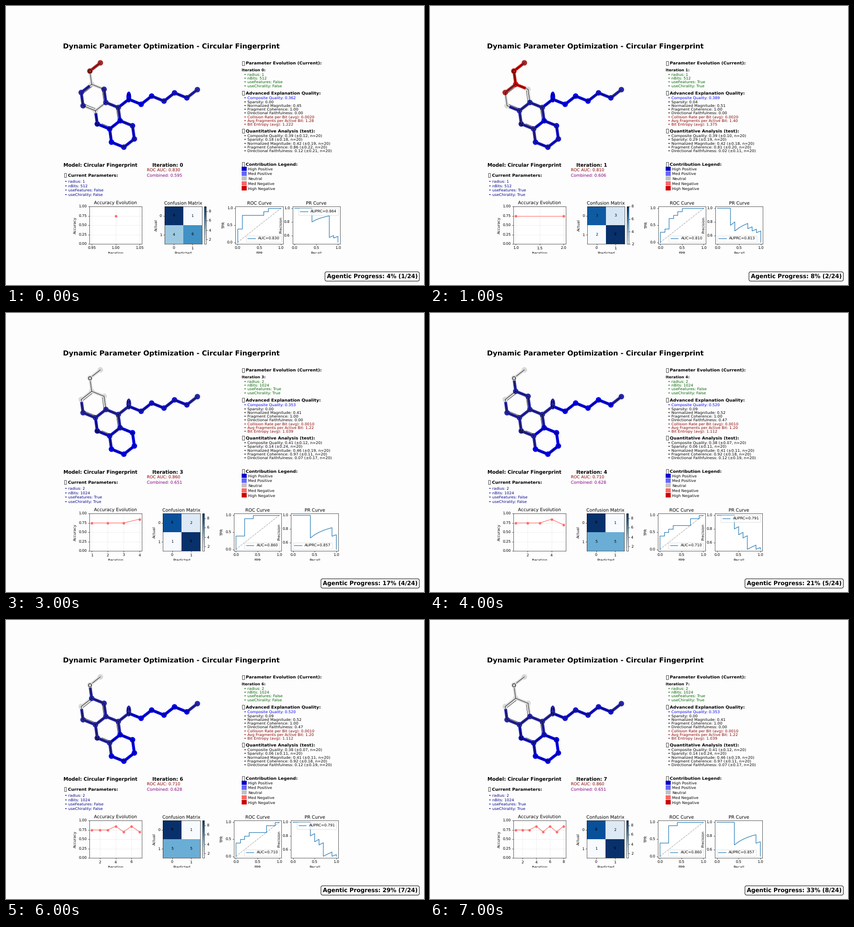
A matplotlib script for the animation above (8 s loop, 917 by 611 pixels).

```python
import numpy as np
import matplotlib as mpl
import matplotlib.pyplot as plt
from matplotlib.animation import FuncAnimation
from matplotlib.patches import Circle, Ellipse, Rectangle

W, H, DPI = 917, 611, 64
PT = 72 / DPI            # points per pixel
BG = "#fdfdfd"

# The small charts use the default style, scaled down.
mpl.rcParams.update({"font.family": "DejaVu Sans", "text.hinting": "none"})
STYLE_KEYS = ["font.size", "lines.linewidth", "lines.markersize",
              "lines.markeredgewidth", "axes.linewidth", "axes.labelpad",
              "axes.titlepad", "grid.linewidth", "patch.linewidth"]
STYLE_KEYS += [f"{a}tick.major.{k}" for a in "xy" for k in ("size", "width", "pad")]
for key in STYLE_KEYS:
    mpl.rcParams[key] *= 0.819 * PT


def walk(start, turns, length=29.24, tilt=22):
    """Points reached by unit bonds, each digit a multiple of 60 degrees."""
    angles = np.radians(tilt + 60 * np.array([int(t) for t in turns]))
    steps = length * np.column_stack([np.cos(angles), np.sin(angles)])
    return start + np.cumsum(steps, axis=0)


# Molecule: aromatic backbone, saturated ring, amine chain.
START = np.array([[207, 124.5]])
BACKBONE = np.vstack([START, walk(START[0], "21210105434")])
ATOMS = np.vstack([BACKBONE, walk(BACKBONE[8], "0123"),
                   walk(BACKBONE[9], "5050505")])
OXYGEN, NITROGEN, AMINE = 1, 6, 16
BENZO, PYRIDINE = [2, 3, 4, 5, 10, 11], [5, 6, 7, 8, 9, 10]
BONDS = [(k, k + 1) for k in range(22) if k not in (11, 15)]
BONDS += [(11, 2), (10, 5), (8, 12), (15, 7), (9, AMINE)]
DOUBLE = {(2, 3): BENZO, (4, 5): BENZO, (10, 11): BENZO,
          (6, 7): PYRIDINE, (8, 9): PYRIDINE}
GAPS = {OXYGEN: 7, NITROGEN: 6, AMINE: 6}
SHADES = {"R": "#cd0f0f", "r": "#a82a2a", ".": "#d9d9d9",
          "1": "#2828a8", "2": "#1414cc", "3": "#0000ee"}

QUALITY = ["Composite Quality", "Sparsity", "Normalized Magnitude",
           "Fragment Coherence", "Directional Faithfulness",
           "Collision Rate per Bit (avg)", "Avg Fragments per Active Bit",
           "Bit Entropy (avg)"]
LEGEND = [("High Positive", "#0000cc"), ("Med Positive", "#6666ff"),
          ("Neutral", "#c0c0c0"), ("Med Negative", "#ff6666"),
          ("High Negative", "#cc0000")]


class Setting:
    """One parameter choice; scores follow from the ranked test items."""

    def __init__(self, radius, flag, ranking, cut, combined, quality, test, tones):
        bits = 512 * radius
        self.flag, self.combined, self.tones = flag, combined, tones
        self.params = [f"radius: {radius}", f"nBits: {bits}",
                       f"useFeatures: {flag}", f"useChirality: {flag}"]
        values = quality.split()
        values.insert(5, f"{1 / bits:.4f}")
        self.quality = [f"{n}: {v}" for n, v in zip(QUALITY, values)]
        pairs = [v.split("/") for v in test.split()]
        self.test = [f"{n}: {m} (±{d}, n=20)" for n, (m, d) in zip(QUALITY, pairs)]

        hits = np.array([c == "P" for c in ranking])
        tp, fp = np.cumsum(hits), np.cumsum(~hits)
        precision = tp / (tp + fp)
        self.tpr, self.fpr = np.r_[0, tp] / 10, np.r_[0, fp] / 10
        self.precision = np.r_[1, precision]
        self.auc = tp[~hits].sum() / 100
        self.auprc = precision[hits].mean()
        t, f = tp[cut - 1], fp[cut - 1]
        self.matrix = np.array([[10 - f, f], [10 - t, t]])
        self.accuracy = np.trace(self.matrix) / 20


SETTINGS = {
    "A": Setting(1, False, "PPPPNPPPPNNNNNPNPNNN", 7, "0.595",
                 "0.362 0.00 0.45 1.00 0.00 1.28 1.222",
                 "0.39/0.12 0.18/0.18 0.42/0.19 0.86/0.22 0.12/0.21",
                 "rr.11.233111" "2223" "3332221"),
    "B": Setting(1, True, "PPPNPNPPPNPNPNPNNNNN", 11, "0.606",
                 "0.389 0.04 0.51 1.00 0.00 1.40 1.375",
                 "0.39/0.10 0.29/0.19 0.42/0.18 0.81/0.20 0.02/0.11",
                 "rRRr.111311." "2222" "3333221"),
    "C": Setting(2, False, "PPPPNPNPNPNNNNPPNNPN", 6, "0.628",
                 "0.520 0.09 0.52 1.00 0.47 1.20 1.112",
                 "0.38/0.07 0.06/0.11 0.41/0.11 0.92/0.18 0.12/0.19",
                 "..1.11113111" "3333" "1333331"),
    "D": Setting(2, True, "PPPPNNPPPPPNNPNNNNNN", 11, "0.651",
                 "0.353 0.00 0.41 1.00 0.00 1.22 1.039",
                 "0.41/0.12 0.14/0.24 0.46/0.19 0.97/0.11 0.07/0.17",
                 "....1122211." "3333" "1222221"),
}
SEQUENCE = "ABADCDCD"
TOTAL = 24

fig = plt.figure(figsize=(W / DPI, H / DPI), dpi=DPI, facecolor=BG)


def page_axes():
    ax = fig.add_axes([0, 0, 1, 1])
    ax.set(xlim=(0, W), ylim=(H, 0))
    ax.axis("off")
    return ax


def box_axes(left, width, top=439.3, height=82):
    return fig.add_axes([left / W, 1 - (top + height) / H, width / W, height / H])


def write(ax, x, y, text, px, color="black", bold=False, ha="left"):
    """Text whose capitals are centred on height y."""
    ax.text(x, y + 0.365 * px, text, fontsize=px * PT, color=color, ha=ha,
            va="baseline", weight="bold" if bold else "normal")


def heading(ax, x, y, text):
    ax.add_patch(Rectangle((x + 1.2, y - 4.6), 4.4, 9.3, fill=False, lw=0.7 * PT))
    write(ax, x + 9.3, y, text, 9.47, bold=True)


def bullets(ax, x, y, lines, step, colors):
    for k, (line, color) in enumerate(zip(lines, colors)):
        write(ax, x, y + k * step, "• " + line, 8.38, color)


def draw_molecule(ax, tones):
    for a, b in BONDS:
        p, q = ATOMS[a], ATOMS[b]
        # A bond takes the shade of the atom it leads to.
        ax.plot(*zip(p, q), color=SHADES[tones[b]], lw=6.4 * PT,
                solid_capstyle="butt", zorder=1)
        u = (q - p) / np.hypot(*(q - p))
        ends = p + u * GAPS.get(a, 0), q - u * GAPS.get(b, 0)
        ax.plot(*zip(*ends), color="black", lw=0.85 * PT, zorder=4)
        if (a, b) in DOUBLE:
            side = np.array([-u[1], u[0]])
            side *= np.sign(side @ (ATOMS[DOUBLE[a, b]].mean(axis=0) - p))
            inner = ends[0] + 4.3 * side + 3 * u, ends[1] + 4.3 * side - 3 * u
            ax.plot(*zip(*inner), color="black", lw=0.75 * PT, zorder=4)
    for k, p in enumerate(ATOMS):
        style = dict(color=SHADES[tones[k]], lw=0, zorder=2)
        ax.add_patch(Ellipse(p - (0, 5), 10.4, 24, **style) if k == AMINE
                     else Circle(p, 6, **style))
    for k, name, rise in [(OXYGEN, "O", 0), (NITROGEN, "N", 0),
                          (AMINE, "N", 0), (AMINE, "H", 10)]:
        x, y = ATOMS[k]
        write(ax, x, y + 0.4 - rise, name, 11, ha="center")


def draw_text(ax, s, step):
    write(ax, 125.4, 87, "Dynamic Parameter Optimization - Circular Fingerprint",
          15.44, bold=True)

    heading(ax, 517, 125.2, "Parameter Evolution (Current):")
    write(ax, 516.6, 140.3, f"Iteration {step}:", 8.2, bold=True)
    bullets(ax, 522.4, 149.6, s.params, 8.25, ["darkgreen"] * 4)

    heading(ax, 517, 190.5, "Advanced Explanation Quality:")
    bullets(ax, 522.4, 200.5, s.quality, 8.27,
            ["blue"] + ["black"] * 4 + ["darkred"] * 3)

    heading(ax, 517, 273.3, "Quantitative Analysis (test):")
    bullets(ax, 522.4, 283.2, s.test, 8.32, ["black"] * 5)

    write(ax, 125.8, 347.7, "Model: Circular Fingerprint", 10.65, bold=True)
    write(ax, 321.3, 347.7, f"Iteration: {step}", 10.65, bold=True)
    write(ax, 309.4, 358.2, f"ROC AUC: {s.auc:.3f}", 9, "darkred")
    write(ax, 309.4, 370.2, f"Combined: {s.combined}", 9, "purple")
    heading(ax, 126.3, 370.3, "Current Parameters:")
    bullets(ax, 129, 384, s.params, 9.45, ["darkblue"] * 4)

    heading(ax, 517, 347, "Contribution Legend:")
    for k, (name, color) in enumerate(LEGEND):
        y = 356.5 + 10.65 * k
        ax.add_patch(Rectangle((517, y - 4.7), 11.2, 9.2, color=color, lw=0))
        write(ax, 531, y, name, 8.38)


def draw_accuracy(step):
    ax = box_axes(183, 115)
    values = [SETTINGS[c].accuracy for c in SEQUENCE[:step + 1]]
    ax.plot(range(1, step + 2), values, "o-", color="#ff6b6b")
    ax.set(ylim=(0, 1), yticks=np.linspace(0, 1, 5), title="Accuracy Evolution",
           xlabel="Iteration", ylabel="Accuracy")
    ax.grid(alpha=0.3)


def draw_confusion(s, dx):
    ax = box_axes(347.6 + dx, 82)
    image = ax.imshow(s.matrix, cmap="Blues", aspect="auto")
    ax.set(xticks=[0, 1], yticks=[0, 1], title="Confusion Matrix",
           xlabel="Predicted", ylabel="Actual")
    for (r, c), n in np.ndenumerate(s.matrix):
        ax.text(c, r, n, ha="center", va="center")
    fig.colorbar(image, cax=box_axes(434.5 + dx, 4.3), ticks=[2, 4, 6, 8])


def draw_curves(s, dx):
    halves = [0, 0.5, 1]
    roc = box_axes(503.3 + dx, 104.5)
    roc.plot(s.fpr, s.tpr, label=f"AUC={s.auc:.3f}")
    roc.plot([0, 1], [0, 1], "k--", alpha=0.3)
    roc.set(title="ROC Curve", xlabel="FPR", ylabel="TPR",
            xticks=halves, yticks=halves)
    roc.legend(loc="lower right")

    pr = box_axes(628.5 + dx, 104.5)
    pr.plot(s.tpr, s.precision, label=f"AUPRC={s.auprc:.3f}")
    pr.set(title="PR Curve", xlabel="Recall", ylabel="Precision",
           xticks=halves, yticks=[0.6, 0.8, 1])
    pr.legend(loc="lower left" if s.flag else "upper right")


def draw_progress(step):
    n = step + 1
    fig.text(902.9 / W, 1 - 592.3 / H,
             f"Agentic Progress: {100 * n / TOTAL:.0f}% ({n}/{TOTAL})",
             fontsize=12.67 * PT, weight="bold", ha="right", va="center", zorder=6,
             bbox=dict(boxstyle="round,pad=0.3", fc="white", ec="black", lw=1.05 * PT))


def update(step):
    fig.clear()
    s = SETTINGS[SEQUENCE[step]]
    dx = -min(2.6 * step, 3.6)   # charts close up as tick labels narrow
    page = page_axes()
    draw_molecule(page, s.tones)
    draw_text(page, s, step)
    draw_accuracy(step)
    draw_confusion(s, dx)
    draw_curves(s, dx)
    # The chart strip is cut off below its axis labels.
    fig.add_artist(Rectangle((0, 0), 1, 1 - 542 / H, color=BG, lw=0, zorder=5))
    draw_progress(step)
    return []


anim = FuncAnimation(fig, update, frames=len(SEQUENCE), interval=1000, repeat=True)
plt.show()
```
